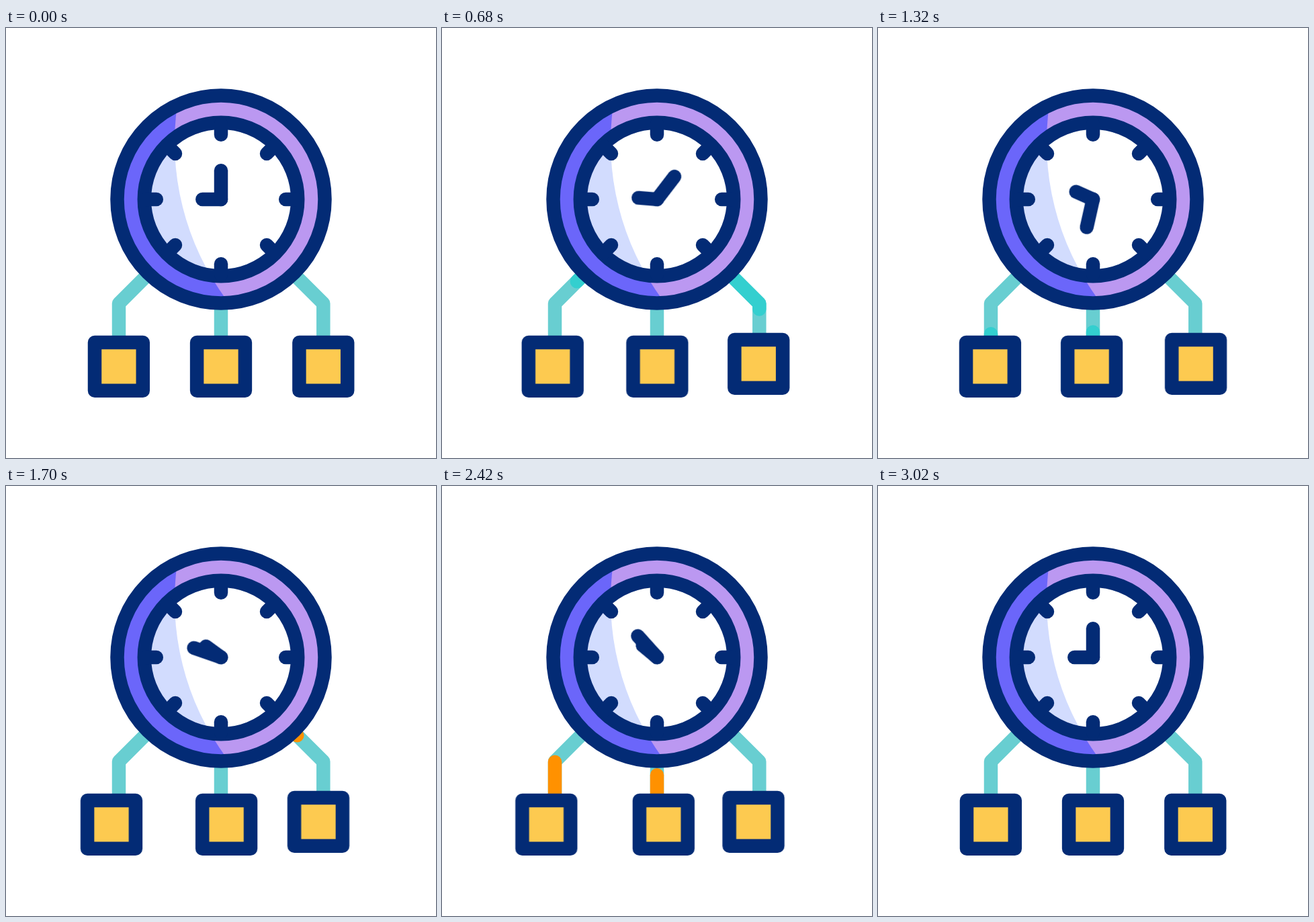
An HTML page without scripts for the animation above (3600 ms loop, 640 by 640 pixels).

```html
<!DOCTYPE html>
<html lang="en">
<head>
<meta charset="utf-8">
<title>Clock network</title>
<style>
html, body { margin: 0; width: 100%; height: 100%; overflow: hidden; background: #fff; }
svg { display: block; width: 100vw; height: 100vh; }

.navy { stroke: #032b75; stroke-width: 20.5; }
.round { fill: none; stroke-width: 20.5; stroke-linecap: round; stroke-linejoin: round; }
.wire { stroke: #68ced1; }

/* pulses running from the clock to the boxes */
.pulse { stroke: #ff9100; animation: 3.6s linear infinite; }
.pulse path { animation: 3.6s linear infinite; }
.side { stroke-dasharray: 62 400; }
.mid { stroke-dasharray: 28 300; }
.pulse .right { animation-name: run-right; }
.pulse .left { animation-name: run-left; }
.pulse .mid { animation-name: run-mid; }
.pulse.teal { stroke: #33cfcf; }
.pulse.teal path { animation-delay: -1.285s; }

@keyframes run-right {
  0%, 41.81% { stroke-dashoffset: 62; }
  70.06%, 100% { stroke-dashoffset: -182; }
}
@keyframes run-left {
  0%, 48.19% { stroke-dashoffset: 62; }
  76.44%, 100% { stroke-dashoffset: -182; }
}
@keyframes run-mid {
  0%, 49.11% { stroke-dashoffset: 28; }
  81.06%, 100% { stroke-dashoffset: -110; }
}

/* boxes sway between two extremes, starting and ending at rest */
.box {
  fill: #fdca50; stroke-linejoin: round;
  animation: sway 3.6s cubic-bezier(.333, 0, .667, 1) infinite;
}
@keyframes sway {
  0%, 6.17%, 83.42%, 100% { transform: translate(0, 0); }
  14.75%, 31.92%, 49.08%, 66.25% { transform: translate(var(--a), var(--y)); }
  23.33%, 40.5%, 57.67%, 74.83% { transform: translate(var(--b), var(--y)); }
}

.hand {
  transform-origin: 320px 255px;
  animation: turn 3.6s cubic-bezier(.333, 0, .667, 1) infinite;
}
@keyframes turn {
  0%, 7.92%, 83.4%, 100% { transform: rotate(0deg); }
  62.89% { transform: rotate(var(--turn)); }
}
</style>
</head>
<body>
<svg viewBox="0 0 640 640">
  <defs>
    <clipPath id="rim"><circle cx="320" cy="255" r="154"/></clipPath>
    <clipPath id="face"><circle cx="320" cy="255" r="114"/></clipPath>
    <circle id="light" cx="646" cy="170" r="395"/>
    <path id="tick" d="M320 143V158.8"/>
  </defs>

  <g class="round wire">
    <path d="M240 338L168 410V490"/>
    <path d="M320 380V490"/>
    <path d="M400 338L472.3 410V490"/>
  </g>
  <g class="round pulse teal">
    <path class="side left" d="M240 338L168 410V490"/>
    <path class="mid" d="M320 380V490"/>
    <path class="side right" d="M400 338L472.3 410V490"/>
  </g>
  <g class="round pulse">
    <path class="side left" d="M240 338L168 410V490"/>
    <path class="mid" d="M320 380V490"/>
    <path class="side right" d="M400 338L472.3 410V490"/>
  </g>

  <g class="navy">
    <rect class="box" x="132" y="467.9" width="71.8" height="71.8" style="--a:-13.4px;--b:7.9px;--y:0px"/>
    <rect class="box" x="284.1" y="467.9" width="71.8" height="71.8" style="--a:10.6px;--b:-10.8px;--y:0px"/>
    <rect class="box" x="436.4" y="467.9" width="71.8" height="71.8" style="--a:-9.4px;--b:8px;--y:-4px"/>
  </g>

  <circle cx="320" cy="255" r="154" fill="#6b66fa"/>
  <use href="#light" fill="#bb98f1" clip-path="url(#rim)"/>
  <circle class="navy" cx="320" cy="255" r="154.5" fill="none"/>
  <circle cx="320" cy="255" r="114" fill="#d2dcfe"/>
  <use href="#light" fill="#fff" clip-path="url(#face)"/>
  <circle class="navy" cx="320" cy="255" r="114.2" fill="none"/>

  <g class="navy round">
    <use href="#tick"/>
    <use href="#tick" transform="rotate(45 320 255)"/>
    <use href="#tick" transform="rotate(90 320 255)"/>
    <use href="#tick" transform="rotate(135 320 255)"/>
    <use href="#tick" transform="rotate(180 320 255)"/>
    <use href="#tick" transform="rotate(225 320 255)"/>
    <use href="#tick" transform="rotate(270 320 255)"/>
    <use href="#tick" transform="rotate(315 320 255)"/>
    <path class="hand" d="M320 255H292.3" style="--turn:45deg"/>
    <path class="hand" d="M320 255V212.3" style="--turn:360deg"/>
  </g>
</svg>
</body>
</html>
```
